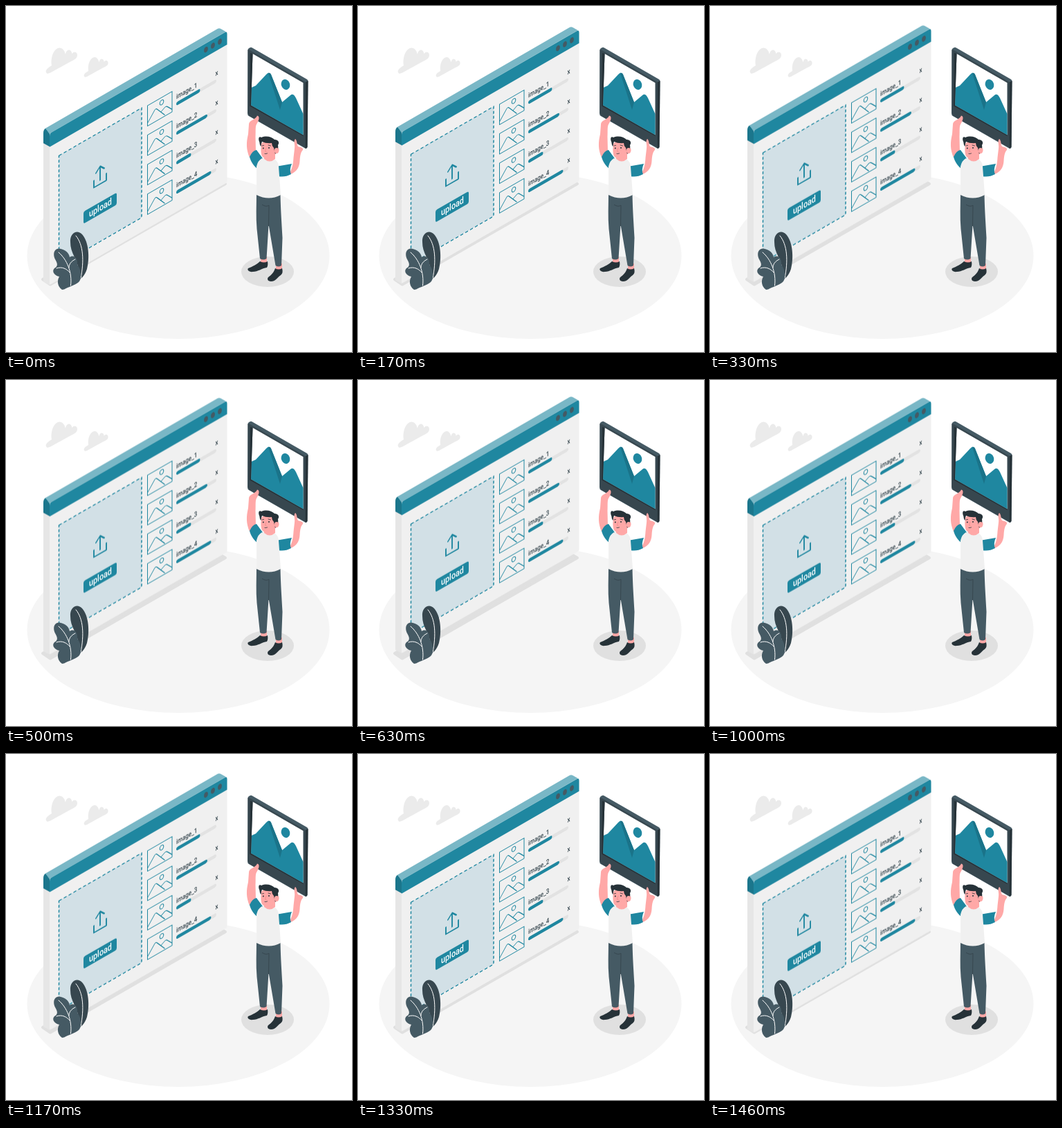
Write an HTML page that moves like this. It is 500x500 px and loops after 1.5 s.

```html
<!DOCTYPE html>
<html lang="en">
<head>
<meta charset="utf-8">
<title>Image upload</title>
<style>
  html, body { margin: 0; width: 100%; height: 100%; overflow: hidden; background: #fff; }
  svg { display: block; width: 100vw; height: 100vh; }
  text { font-family: Roboto, Arial, sans-serif; font-weight: 500; }
  .teal { fill: #1f87a0; }
  .line { fill: none; stroke: #1f87a0; }
  .dark { fill: #263238; }
  .slate { fill: #37474f; }
  .steel { fill: #455a64; }
  .skin { fill: #ffa8a7; }
  .vein { fill: none; stroke: #fff; stroke-width: 1; stroke-linecap: round; }
</style>
</head>
<body>
<svg viewBox="0 0 500 500">
  <defs>
    <path id="cloud" fill="#ebebeb" d="M58 96C56 92 63 88 66 86C64 73 70 60 78 60.500C83 61 85 66 86 70C87 62 94 61 95.500 69C98 65 103 66 103 71C103 76 98 78 94 80L64 96.500Q59 99 58 96Z"/>
  </defs>

  <ellipse cx="249" cy="361" rx="218.500" ry="120" fill="#f5f5f5"/>
  <use href="#cloud"/>
  <use href="#cloud" transform="translate(68.300 27.500) scale(.77)"/>
  <path d="M53 395L64 402.500L317 257L307 251Z" fill="#e0e0e0" stroke="#e0e0e0" stroke-width="4" stroke-linejoin="round"/>

  <g id="panel">
    <path d="M54 181V398.500L63.500 403.500V184Z" fill="#e6e6e6"/>
    <path d="M54 184Q54 179 57 177L64 184V204L54 198.500Z" fill="#1b768c"/>
    <path d="M57 177L306 33Q308 31.800 310 33L318 37.500L65 184Q63 186 62 184Z" fill="#79b7c6"/>
    <!-- front face, drawn flat and skewed into place -->
    <g id="front" transform="translate(63 184.500) skewY(-30)">
      <rect width="256.500" height="219" rx="2" fill="#f0f0f0"/>
      <path class="teal" d="M0 19.500V4Q0 0 3 0H253.500Q256.500 0 256.500 4V19.500Z"/>
      <g class="steel">
        <ellipse cx="226" cy="9.200" rx="2.900" ry="4"/>
        <ellipse cx="236" cy="9.200" rx="2.900" ry="4"/>
        <ellipse cx="246" cy="9.200" rx="2.900" ry="4"/>
      </g>
      <rect x="13.500" y="39.800" width="119.500" height="158.500" fill="#d2e0e6" stroke="#1f87a0" stroke-width="1.500" stroke-dasharray="4 3"/>
      <path class="line" stroke-width="1.900" stroke-linecap="round" stroke-linejoin="round" d="M73 109.500V89.500M67 96L73 89.500L79 96M64 105V115H82V105"/>
      <rect class="teal" x="49" y="141.300" width="48" height="17.500" rx="2.500"/>
      <text transform="translate(73.500 154) scale(.8 1)" font-size="13.500" text-anchor="middle" fill="#fff">upload</text>
    </g>
  </g>

  <g id="plant">
    <path class="slate" d="M93 341C92 328 103 322 110 330C120 341 121 365 117 380C114 390 108 395 103 397C107 384 104 373 99 363C95 355 93 349 93 341Z"/>
    <path class="vein" d="M101 332C112 345 113 368 108 394"/>
    <path class="steel" d="M81 410C75 406 73 398 77 391C69 389 66 383 70 379C76 376 74 371 71 366C67 358 70 350 77 350.500C86 352 91 357 92 363C98 359 104 364 103 374C109 380 110 395 105 399C99 404 90 406 84 409.500Z"/>
    <path class="vein" d="M76 356C88 366 96 385 93.500 404M73 379C81 376 88 380 92 385M100 366C94 369 91 373 91 378"/>
  </g>

  <g id="frame">
    <path class="steel" d="M349.500 64Q349.500 62 351 61L353 60Q354.500 59.500 356 60.500L435 106Q436.500 107 436.500 109L435.500 204Q435 207 432 205.500L351 159Q349 158 349 155Z"/>
    <path class="slate" d="M352.500 64L433.500 110.500L432.500 205L351 158.500L349.500 155V63Z"/>
    <path class="dark" d="M433 110L436.500 108L435.500 204L432.500 206Z"/>
    <path fill="#fff" d="M356.500 69L429.500 111V186.500L354 143.500Z"/>
    <path class="teal" d="M354.500 118L361 115L376 99Q380 94 383 99L399 139L411 129Q415 125 419 133L429.500 156V186.500L354 143.500Z"/>
    <path fill="#1a7389" d="M379 97Q382 96 383 99L399 139L396 150Z"/>
    <ellipse class="teal" cx="404" cy="113.500" rx="6.200" ry="7.600" transform="rotate(-20 404 113.500)"/>
    <path class="dark" d="M353 68L356.500 69L354 143.500L429.500 186.500V188L352 144.500Z"/>
  </g>

  <g id="man">
    <ellipse cx="378" cy="384" rx="38" ry="22" fill="#e0e0e0"/>
    <path class="skin" d="M368 362H377V372H368ZM390 372H399V383H390Z"/>
    <path class="dark" d="M367 369Q373 372 378 369Q379 375 377 378C370 379 364 384 357 384C351 385 348 381 350 379C357 376 362 374 367 369Z"/>
    <path class="dark" d="M389 379Q394 382 399 379Q401 386 397 389C393 391 390 398 383 398C378 398 377 394 379 392C384 388 387 385 389 379Z"/>
    <path class="steel" d="M362 270L396.500 272C397 297 398.500 315 399.500 335L398 375Q394 378 389.500 375L379.500 316L376.500 365Q372 368 367 365L362.500 322C361 305 362 288 362 270Z"/>
    <path fill="none" stroke="#37474f" stroke-width="1" d="M370 287Q376 291 380 288M380 288L379.500 318"/>
    <path class="skin" d="M352 219C347 207 347 198 350 185L351 171C351 165 360 165 363 158.500C367 159 366 165 362 171C360 174 361 183 360.500 189L361 210Z"/>
    <path class="skin" d="M409 243C414 235 415 227 415.500 219L417 206C418 200 415 196 418 192C421 194 420 200 422 203C426 204 430 205 429 208C426 211 425 216 424.500 224C424 233 420 240 411 243Z"/>
    <path class="teal" d="M352 218Q356 209 362 208L373 223L365 237C359 232 354 226 352 218Z"/>
    <path class="teal" d="M390 232L413 228Q409 237 412 243Q403 248 393 246Z"/>
    <path fill="#f0f0f0" d="M370 220Q379 224 389 222Q394 226 394 232L397 273Q380 282 362 273L362 232Q364 223 370 220Z"/>
    <path class="skin" d="M372 215L389 210V221Q381 228 373 221Z"/>
    <path class="skin" d="M369 199C368 207 368 215 371 218C376 222 384 219 388 214C395 214 397 205 391 204L389 196Q377 191 369 199Z"/>
    <path class="dark" d="M368.500 203C366 200 367 198 366 196C364 191 366 188 369 190C376 187 384 189 388 193C393 193 396 197 393 201C394 207 392 211 389 214L387 205Q384 202 384 198Q376 199 370 196Q368.500 199 368.500 203Z"/>
    <ellipse class="skin" cx="391" cy="209" rx="3.200" ry="4"/>
    <g class="dark">
      <circle cx="371.800" cy="205.500" r="1"/>
      <circle cx="380" cy="205" r="1"/>
    </g>
    <path fill="none" stroke="#263238" stroke-width=".8" stroke-linecap="round" d="M370 202L372.500 201.500M379 201L382.500 202M374 213.500Q375.500 214 377.500 213"/>
    <path fill="none" stroke="#f28f8f" stroke-width=".9" d="M376 205L374.500 210L376.500 210.500"/>
  </g>
</svg>
<script>
  const NS = 'http://www.w3.org/2000/svg';
  const front = document.getElementById('front');

  function add(parent, tag, attrs, text) {
    const el = document.createElementNS(NS, tag);
    for (const key in attrs) el.setAttribute(key, attrs[key]);
    if (text) el.textContent = text;
    parent.append(el);
    return el;
  }

  function label(parent, x, y, text) {
    add(parent, 'text', {
      transform: `translate(${x} ${y}) scale(.8 1)`, 'font-size': 10, fill: '#37474f'
    }, text);
  }

  function bar(parent, length, color) {
    add(parent, 'path', {
      d: `M44 21.700h${length}`, stroke: color, 'stroke-width': 5, 'stroke-linecap': 'round'
    });
  }

  // One row per file: length of the filled part of its bar
  [29.5, 40, 16.5, 45.5].forEach((done, i) => {
    const row = add(front, 'g', { transform: `translate(141.5 ${41.3 + i * 42.6})` });
    add(row, 'path', {
      class: 'line', 'stroke-linejoin': 'round',
      d: 'M0 0H35.500V29.500H0ZM0 25.500L10 13Q12 10.500 14 13.500L25 28M19 20.500L25 17Q27 16 29 18.500L35.500 26'
    });
    add(row, 'ellipse', { class: 'line', cx: 20.5, cy: 7.3, rx: 2.8, ry: 3.3 });
    label(row, 41.5, 14.8, `image_${i + 1}`);
    bar(row, 53, '#e2e2e2');
    bar(row, done, '#1f87a0');
    label(row, 98, 14, 'x');
  });

  document.getElementById('panel').animate(
    [0, -10, 0].map(y => ({ transform: `translateY(${y}px)` })),
    { duration: 1500, iterations: Infinity }
  );
</script>
</body>
</html>
```
